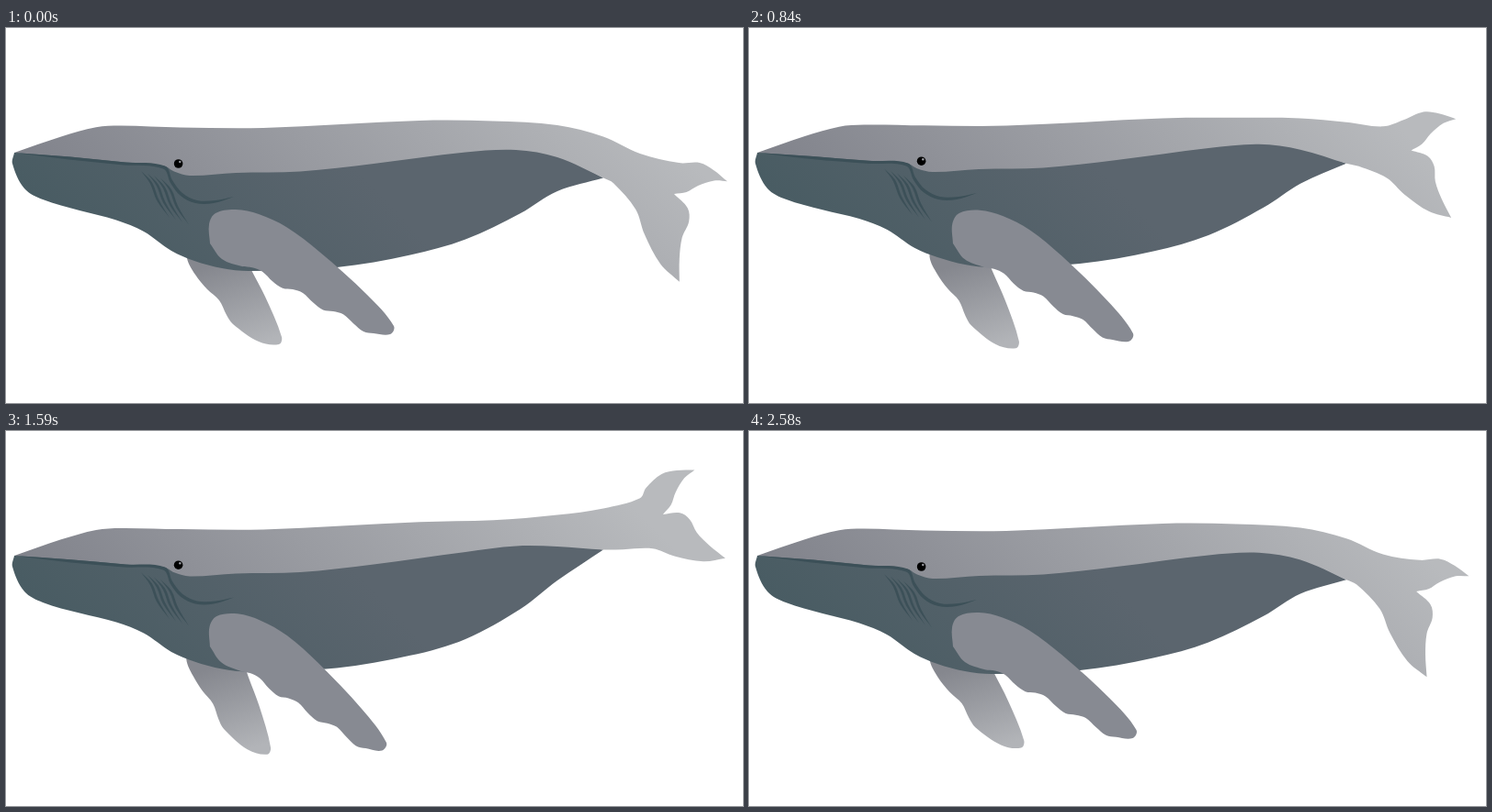
Animation of 802x409 px, one loop 2.61 s. Source, as an HTML page with a canvas:

```html
<!DOCTYPE html>
<html>
<head>
<meta charset="utf-8">
<title>Swimming whale</title>
<style>
html, body { margin: 0; width: 100%; height: 100%; overflow: hidden; background: #fff; }
canvas { display: block; }
</style>
</head>
<body>
<canvas id="stage" width="802" height="409"></canvas>
<script>
const ctx = document.getElementById('stage').getContext('2d');
const LOOP = 2610, STEP = 30, TAIL_UP = 2040, BODY_HIGH = 1050, BODY_REST = 2150;

// Key points of the resting body, tail low
const back = [[9, 136], [60, 118.5], [98, 108.3], [125, 106.5], [190, 108.5], [280, 109],
  [450, 101], [530, 101.5], [600, 106], [650, 118.5], [690, 137]];
const divide = [[650, 163.5], [600, 141], [555, 133], [500, 135.5], [400, 148], [320, 156.5],
  [250, 158], [200, 161], [183, 156.5], [172, 150.5], [130, 146.5], [70, 140.5], [9, 136]];
const belly = [[9, 136], [7, 148], [20, 175], [40, 187], [80, 199], [120, 209.5], [150, 222],
  [180, 243], [205, 254], [235, 262], [265, 265], [360, 261], [440, 247.5], [500, 230.5],
  [560, 202], [600, 178], [650, 163.5]];

// Fluke lobes at mid swing, relative to the notch between them
const upperLobe = { outer: [[-11, -32.5], [9, -43], [26, -43]], tip: [45, -39], inner: [[32, -33], [19, -20], [11, -8]] };
const lowerLobe = { inner: [[18, 4], [26, 14], [29, 30], [38, 48]], tip: [50, 66], outer: [[26, 62], [-2, 47], [-22, 32], [-53, 23]] };

const scallops = Array.from({ length: 14 }, (_, i) => {
  const x = 400 - 11 * i;
  return [x, 328 + .533 * (x - 390) + 3.5 * Math.cos(2 * Math.PI * (x - 388) / 45)];
});
const nearFin = [[222, 235], [221, 214], [228, 202], [250, 198], [275, 203], [305, 217], [341, 244],
  [393, 291], [422, 325], [418, 334], ...scallops, [235, 252], [222, 235]];
const farFin = [[200, 235], [197, 251], [206, 269], [219, 285], [232, 297], [240, 313], [247, 323],
  [275, 342], [297, 345], [300, 337], [282, 293], [267, 264], [255, 240]];
const mouth = [[9, 136], [70, 140.5], [130, 146.5], [173, 150.5], [181, 166], [192, 180],
  [208, 188], [228, 188], [248, 184]];

function gradient(x0, y0, x1, y1, from, to) {
  const g = ctx.createLinearGradient(x0, y0, x1, y1);
  g.addColorStop(0, from);
  g.addColorStop(1, to);
  return g;
}
const lightSkin = gradient(100, 300, 500, -100, '#7b7d86', '#b8babd');
const darkSkin = gradient(130, 290, 330, 100, '#495c63', '#5b656e');
const farSkin = gradient(235, 255, 265, 347, '#85878e', '#b2b4b8');

// Smooth curve through the points, appended to the current path
function curve(pts) {
  const handle = (i, len, sign) => {
    const a = pts[Math.max(i - 1, 0)], b = pts[Math.min(i + 1, pts.length - 1)];
    const k = sign * len / 3 / (Math.hypot(b[0] - a[0], b[1] - a[1]) || 1);
    return [pts[i][0] + (b[0] - a[0]) * k, pts[i][1] + (b[1] - a[1]) * k];
  };
  ctx.lineTo(...pts[0]);
  for (let i = 1; i < pts.length; i++) {
    const [p, q] = [pts[i - 1], pts[i]];
    const len = Math.hypot(q[0] - p[0], q[1] - p[1]);
    ctx.bezierCurveTo(...handle(i - 1, len, 1), ...handle(i, len, -1), ...q);
  }
}

function fill(color, ...curves) {
  ctx.beginPath();
  curves.forEach(curve);
  ctx.fillStyle = color;
  ctx.fill();
}

// Line that is pointed at both ends
function ribbon(pts, dx, dy) {
  const last = pts.length - 1;
  const side = pts.map(([x, y], i) => i % last ? [x + dx, y + dy] : [x, y]);
  fill('#3c5058', pts, side.reverse());
}

function rotate([x, y], degrees, scale = 1) {
  const c = scale * Math.cos(degrees * Math.PI / 180), s = scale * Math.sin(degrees * Math.PI / 180);
  return [x * c - y * s, x * s + y * c];
}

// Swing a fin around its shoulder, softly near the joint
function swing(pts, px, py, degrees) {
  return pts.map(([x, y]) => {
    const reach = Math.min(1, Math.hypot(x - px, y - py) / 50);
    const [dx, dy] = rotate([x - px, y - py], degrees * reach);
    return [px + dx, py + dy];
  });
}

function disc(x, y, r, color) {
  ctx.beginPath();
  ctx.arc(x, y, r, 0, 7);
  ctx.fillStyle = color;
  ctx.fill();
}

function draw(t) {
  const tail = t < TAIL_UP ? t / TAIL_UP : (LOOP - t) / (LOOP - TAIL_UP);
  const rise = Math.max(0, t < BODY_HIGH ? t / BODY_HIGH : (BODY_REST - t) / (BODY_REST - BODY_HIGH));

  // The chest bobs as a whole, the rear bends up more and more towards the tail
  const bob = x => 5 * rise * Math.max(0, Math.min(1, (x / 200) ** 2, (650 - x) / 100));
  const bend = x => 46 * tail ** 1.2 * Math.max(0, (x - 350) / 300) ** 5;
  const pose = (pts, share = 1) => pts.map(([x, y]) => [x, y - share * bob(x) - bend(x)]);

  const notch = [727 - 15.5 * tail, 181 - 115.5 * tail];
  const turn = (pts, degrees, scale) => pts.map(p => {
    const [dx, dy] = rotate(p, degrees, scale);
    return [notch[0] + dx, notch[1] + dy];
  });
  const upper = pts => turn(pts, 53 * (.52 - tail));
  const lower = pts => turn(pts, 66 * (.51 - tail), 1 + .16 * (1 - tail) ** 3);

  ctx.clearRect(0, 0, 802, 409);
  fill(farSkin, swing(farFin, 225, 240, 8.7 * tail));

  const edge = pose(divide);
  fill(darkSkin, pose(belly), edge.slice(1, -1).map(([x, y]) => [x, y - 5]));
  fill(lightSkin,
    [...pose(back, .6), ...upper([...upperLobe.outer, upperLobe.tip])],
    [...upper([upperLobe.tip, ...upperLobe.inner]), notch],
    [notch, ...lower([...lowerLobe.inner, lowerLobe.tip])],
    [...lower([lowerLobe.tip, ...lowerLobe.outer]), ...edge]);

  ribbon(pose(mouth), -2, 3);
  ctx.save();
  ctx.translate(0, -3.5 * rise);
  for (let i = 0; i < 4; i++) {
    const x = 7 * i, y = 2.5 * i;
    ribbon([[147 + x, 156 + y], [157 + x, 170 + y], [164 + x, 188 + y], [178 + x, 207 + y]], 2, -1.6);
  }
  disc(187.6, 148, 4.8, '#000');
  disc(189.3, 146, 1.2, '#9a9ca2');
  ctx.restore();

  fill('#878a92', swing(nearFin, 230, 230, 5.8 * tail));
}

function frame() {
  draw(Math.floor(performance.now() % LOOP / STEP) * STEP);
  requestAnimationFrame(frame);
}
frame();
</script>
</body>
</html>
```
